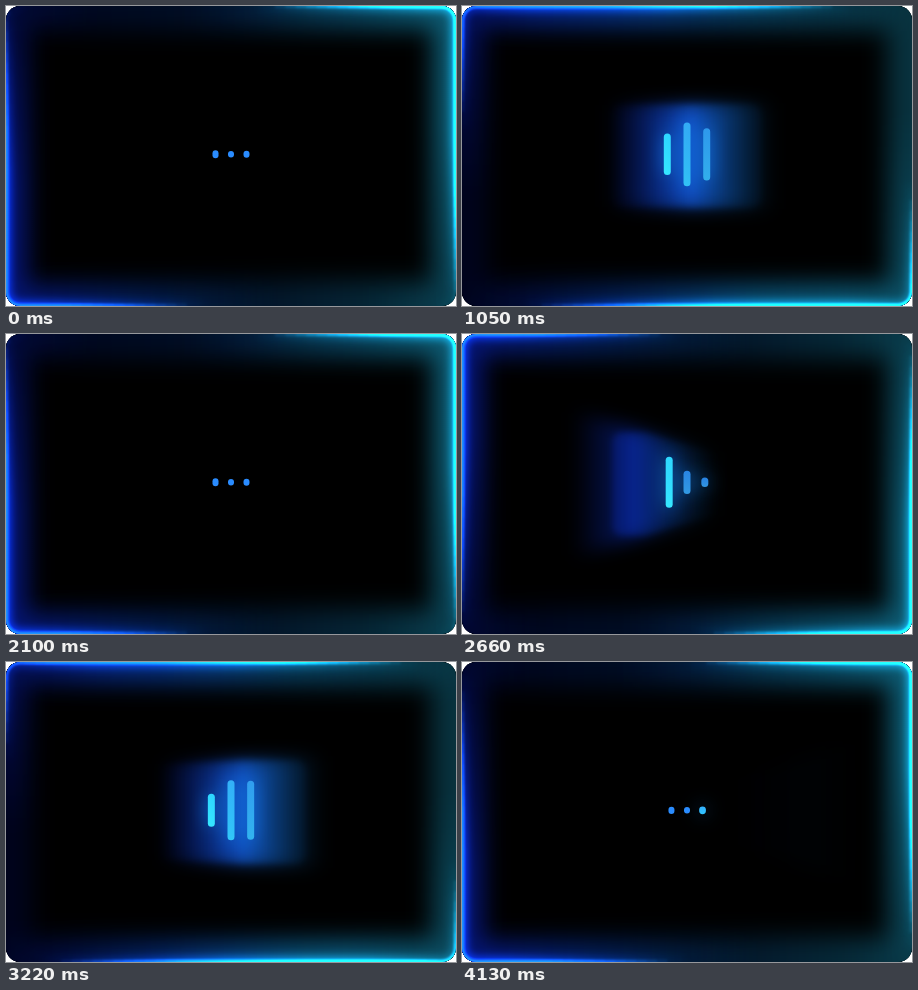
Write an HTML page with a canvas that moves like this. It is 450 px wide and 300 px high and loops after 4.2 s.

```html
<!DOCTYPE html>
<html lang="en">
<head>
<meta charset="utf-8">
<title>Pulse loader</title>
<style>
html, body { margin: 0; width: 450px; height: 300px; overflow: hidden; background: #fff; }
canvas { display: block; }
</style>
</head>
<body>
<canvas id="stage" width="450" height="300"></canvas>
<script>
const W = 450, H = 300, PAD = 40, RADIUS = 14;
const CYCLE = 2100, STEP = 70;
const LAP = 2 * (W + H) - 8 * RADIUS + 2 * Math.PI * RADIUS;

const ctx = document.getElementById('stage').getContext('2d');
const buffer = document.createElement('canvas');
buffer.width = W + 2 * PAD;
buffer.height = H + 2 * PAD;
const ink = buffer.getContext('2d');

const clamp = x => Math.max(0, Math.min(1, x));
const lerp = (a, b, k) => a + (b - a) * k;
const mix = (a, b, k) => `rgb(${a.map((v, i) => Math.round(lerp(v, b[i], k)))})`;

const frame = new Path2D();
frame.roundRect(0, 0, W, H, RADIUS);
const card = new Path2D();
card.roundRect(150, 98, 150, 104, 10);

function across(x0, x1, ...colors) {
  const g = ink.createLinearGradient(x0, 0, x1, 0);
  colors.forEach((c, i) => g.addColorStop(i / (colors.length - 1), c));
  return g;
}

// Paints into the padded buffer, then adds it to the stage blurred.
function soft(blur, alpha, paint) {
  ink.setTransform(1, 0, 0, 1, 0, 0);
  ink.clearRect(0, 0, buffer.width, buffer.height);
  ink.save();
  ink.translate(PAD, PAD);
  paint();
  ink.restore();
  ctx.save();
  ctx.globalCompositeOperation = 'lighter';
  ctx.globalAlpha = alpha;
  ctx.filter = `blur(${blur}px)`;
  ctx.drawImage(buffer, -PAD, -PAD);
  ctx.restore();
}

// Two opposite arcs on the frame, tapered by stacking shorter and shorter dashes.
function arcs(center, width, longest, shortest, ...colors) {
  const layers = 12;
  ink.globalCompositeOperation = 'lighter';
  ink.globalAlpha = 1 / layers;
  ink.lineWidth = width;
  ink.strokeStyle = across(0, W, ...colors);
  for (let i = 0; i < layers; i++) {
    const len = lerp(longest, shortest, i / (layers - 1));
    ink.setLineDash([len, LAP / 2 - len]);
    ink.lineDashOffset = len / 2 - center;
    ink.stroke(frame);
  }
}

function drawBorder(t) {
  const center = 490 + LAP / 2 * t / CYCLE;
  soft(12, 0.85, () => {
    ink.lineWidth = 50;
    ink.strokeStyle = across(0, W, '#000422', '#02142e', '#0a3c4a');
    ink.stroke(frame);
  });
  soft(11, 0.55, () => arcs(center, 40, 620, 140, '#0a1c9a', '#0a3a98', '#0a5c78', '#0a4c60'));
  soft(4, 0.65, () => arcs(center, 9, 500, 160, '#0a40ff', '#0a50ff', '#0fa0e0', '#0fa0d8'));
  soft(0.8, 1, () => arcs(center, 4.5, 470, 240, '#1868ff', '#1874ff', '#18c4ff', '#18c8ff'));
}

// A light that crosses the card, opening towards the side it leans to.
function drawPanel(t) {
  const v = (t - 1030) / 520;
  const power = Math.max(0, Math.cos(v * 0.8));
  if (!power) return;
  const peak = 227 + 62 * v;
  const x0 = peak - 85 + 27 * clamp(-v);
  const x1 = peak + 85 - 27 * clamp(v);
  const tilt = 24 * Math.max(-1, Math.min(1, v));
  const beam = new Path2D();
  beam.moveTo(x0, 98 + tilt);
  beam.lineTo(x1, 98 - tilt);
  beam.lineTo(x1, 202 + tilt);
  beam.lineTo(x0, 202 - tilt);

  const light = ink.createLinearGradient(x0, 0, x1, 0);
  light.addColorStop(0, 'rgba(12,44,200,0)');
  light.addColorStop((peak - x0) / (x1 - x0), mix([10, 44, 185], [22, 108, 195], clamp((v + 1) / 2)));
  light.addColorStop(1, 'rgba(14,100,170,0)');

  soft(9, power * 0.7, () => {
    ink.fillStyle = light;
    ink.fill(beam);
  });
  soft(3, power * 0.35, () => {
    ink.clip(beam);
    ink.fillStyle = light;
    ink.fill(card);
  });
}

function drawBars(t) {
  const spread = 15.5 + 2.1 * (1 - Math.cos(2 * Math.PI * t / CYCLE));
  for (let i = 0; i < 3; i++) {
    const d = t - 765 - 240 * i;
    const near = Math.min(Math.abs(d), CYCLE - Math.abs(d));
    const h = 6.5 + 58 * Math.exp(-near * near / 160000);
    const lit = clamp((805 - Math.abs(d - 40)) / 80);
    const w = 6 + lit;
    const warm = clamp((d + 500) / 800);
    const top = i ? [lerp(40, 56, warm), lerp(128, 190, warm), lerp(225, 255, warm)] : [46, 215, 255];
    const bottom = i ? [50, lerp(150, 215, warm), lerp(225, 255, warm)] : [54, 232, 255];
    const x = 225 + (i - 1) * spread - w / 2, y = 148.3 - h / 2;
    const fill = ctx.createLinearGradient(0, y, 0, y + h);
    fill.addColorStop(0, mix([42, 140, 255], top, lit));
    fill.addColorStop(1, mix([42, 140, 255], bottom, lit));
    ctx.save();
    ctx.fillStyle = fill;
    ctx.shadowColor = `rgba(20,140,255,${0.8 * lit})`;
    ctx.shadowBlur = 18;
    ctx.beginPath();
    ctx.roundRect(x, y, w, h, w / 2);
    ctx.fill();
    ctx.restore();
  }
}

function draw() {
  const t = Math.floor(performance.now() / STEP) * STEP % CYCLE;
  ctx.clearRect(0, 0, W, H);
  ctx.save();
  ctx.clip(frame);
  ctx.fillStyle = '#000';
  ctx.fillRect(0, 0, W, H);
  drawBorder(t);
  drawPanel(t);
  drawBars(t);
  ctx.restore();
  requestAnimationFrame(draw);
}
draw();
</script>
</body>
</html>
```
